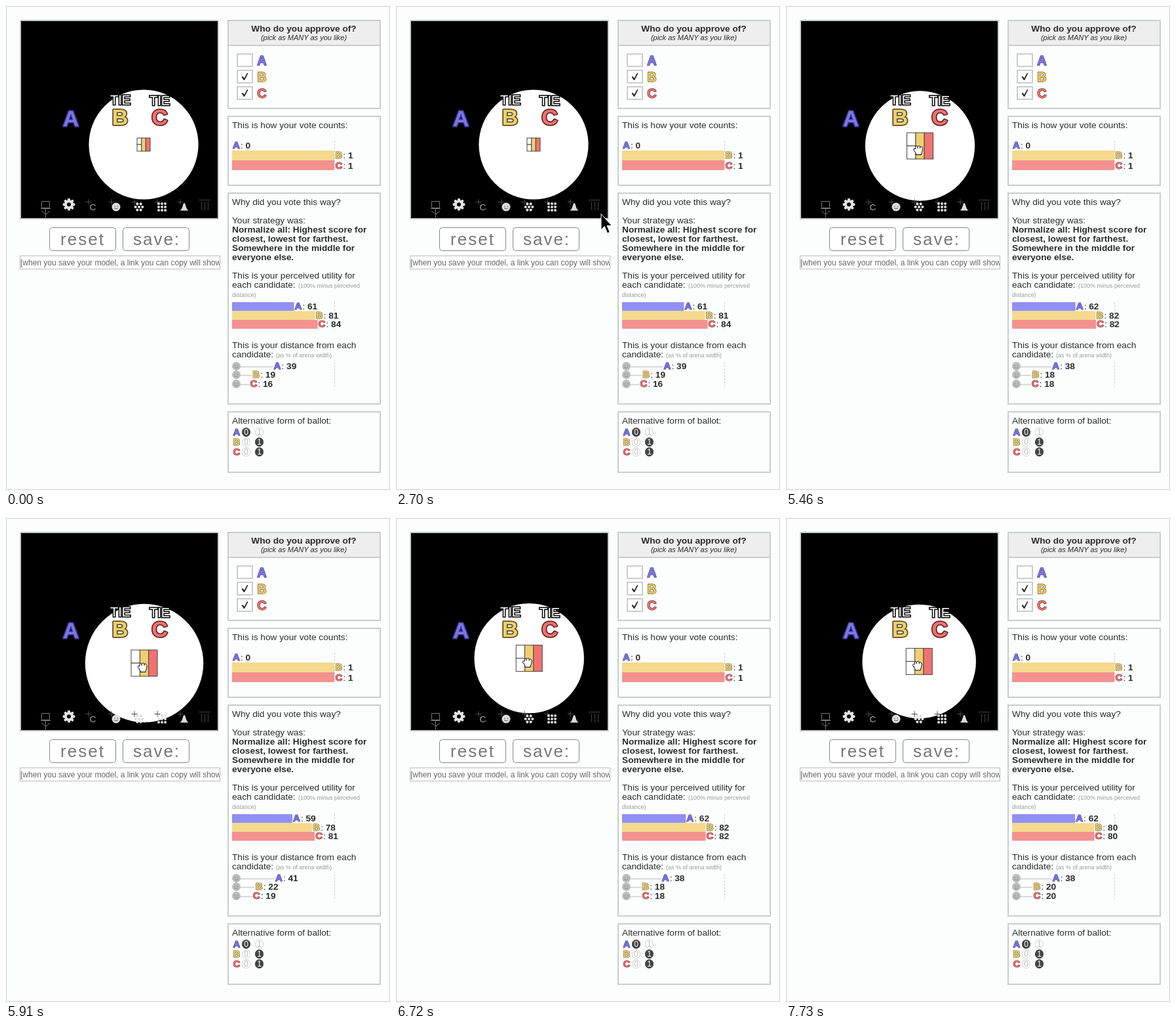
An HTML page that plays this animation: 586x737 px, repeating every 8 s.

```html
<!DOCTYPE html>
<html lang="en">
<head>
<meta charset="utf-8">
<title>Approval ballot</title>
<style>
  html, body { margin: 0; width: 100%; height: 100%; overflow: hidden; background: #fcfefe; }
  svg { display: block; width: 586px; height: 737px; }
  text { font: 13.7px "Liberation Sans", Arial, sans-serif; fill: #2b2b2b; white-space: pre; }
  .bold { font-weight: bold; }
  .mid { text-anchor: middle; }
  .note { font-size: 9px; fill: #999; }
  .box { fill: none; stroke: #ccc; stroke-width: 2; }
  .btn { fill: #fff; stroke: #888; }
  .btnText { font-size: 26px; letter-spacing: 2px; fill: #777; }
  .name { font-weight: bold; paint-order: stroke; stroke-linejoin: round; }
  .A { fill: #7d77ea; stroke: #35317f; }
  .B { fill: #efcf6f; stroke: #5d4d1c; }
  .C { fill: #f07272; stroke: #6b2626; }
  .big { font-size: 34px; stroke-width: 3.5; text-anchor: middle; }
  .row { font-size: 20px; stroke-width: 1.3; text-anchor: middle; }
  .small { font-size: 15px; stroke-width: 1.1; }
  .barA { fill: #9090f4; }
  .barB { fill: #f4d98e; }
  .barC { fill: #f49290; }
  .tie { font-size: 20px; fill: #fff; stroke: #000; stroke-width: 3; paint-order: stroke; text-anchor: middle; }
  .dash { stroke: #ccc; stroke-dasharray: 3 2; }
  .pill { font-size: 12px; text-anchor: middle; }
  .plus { stroke: #4c4c4c; }
  .cursor { stroke-linejoin: round; stroke-linecap: round; }
</style>
</head>
<body>
<svg id="stage" viewBox="0 0 586 737"></svg>
<script>
const NAMES = ['A', 'B', 'C'];
const SPOTS = { A: [99, 170], B: [174, 167.6], C: [233.5, 168.2] };
const LEFT = 345, FULL = 156, ARENA = 300, LOOP = 8000;
const UTIL_Y = [451, 464.5, 478], DIST_Y = [549, 562, 576];

// time, x, y of the pointer on its way to the voter
const APPROACH = [
  [1460, 111, 717], [1580, 145, 705], [1720, 175, 672], [1860, 205, 640],
  [2000, 250, 605], [2150, 295, 560], [2290, 322, 500], [2430, 338, 413],
  [2550, 334, 362], [2700, 313, 317], [2850, 286, 283], [3000, 257, 252],
  [3150, 232, 230], [3300, 207, 210], [3450, 206, 217]
];
const HOVER = 3300, GRAB = 4450;
// time, x, y of the voter while it is dragged around
const DRAG = [
  [0, 210, 211], [5310, 207, 211], [5460, 204.5, 213], [5610, 204, 217],
  [5760, 206.5, 220], [5910, 211, 221], [6030, 216, 220], [6180, 220, 216],
  [6330, 221, 212], [6450, 218.5, 208.5], [6590, 209, 208], [6720, 203.2, 213.6],
  [6850, 203.5, 219.5], [6990, 213, 220], [7130, 220, 215], [7280, 217, 209],
  [7420, 208, 210], [7560, 203.5, 213], [7730, 203.2, 218.4]
];

const stage = document.getElementById('stage');
const text = (x, y, s, cls = '') => `<text x="${x}" y="${y}" class="${cls}">${s}</text>`;
const rect = (x, y, w, h, attrs) => `<rect x="${x}" y="${y}" width="${w}" height="${h}" ${attrs}/>`;
const panel = (y, h) => rect(339, y + 1, 232, h - 2, 'class="box"');
const dash = (y1, y2) => `<path d="M501.5 ${y1}V${y2}" class="dash"/>`;
const dot = (x, y, r, fill) => `<circle cx="${x}" cy="${y}" r="${r}" fill="${fill}"/>`;
const face = (x, y, fill, ink) => dot(x, y, 6.5, fill) + dot(x - 2.2, y - 1, .8, ink) + dot(x + 2.2, y - 1, .8, ink) +
  `<path d="M${x - 3} ${y + 1.5}q3 3 6 0" fill="none" stroke="${ink}"/>`;
const label = (n, x, y, value, id = '') =>
  `<g id="${id}" transform="translate(${x} ${y})">` + text(0, 0, n, `name small ${n}`) +
  text(12, 0, ':') + text(19.5, 0, value, 'bold') + '</g>';
const pill = (x, y, s, on) =>
  rect(x - 6, y - 6.5, 12, 13, `rx="6" fill="${on ? '#444' : '#fff'}" stroke="${on ? '#444' : '#ccc'}"`) +
  `<text x="${x}" y="${y + 4.3}" class="pill" style="fill:${on ? '#fff' : '#bbb'}">${s}</text>`;

function toolbar() {
  let s = `<g fill="none" stroke="#777"><path d="M54.5 297.5h12v10h-12zM53 308.5h15M60.5 308v14M54 312l6.5 5.5 6.5-5.5"/></g>`;
  s += '<g fill="#e4e4e4">';
  for (let a = 0; a < 360; a += 45) s += rect(94, 293, 4, 5, `rx="1" transform="rotate(${a} 96 302.3)"`);
  s += '</g><circle cx="96" cy="302.3" r="5" fill="none" stroke="#e4e4e4" stroke-width="4"/>';
  for (let x = 126; x <= 266; x += 35) s += `<path d="M${x - 4.5} 298.5h9M${x} 294v9" class="plus"/>`;
  s += `<text x="132.5" y="311" class="mid" style="fill:#aaa">C</text>` + face(168, 306, '#ddd', '#555');
  s += dot(203, 306, 2.1, '#ddd');
  for (let i = 0; i < 6; i++) {
    const a = i * Math.PI / 3;
    s += dot(203 + 5.3 * Math.cos(a), 306 + 5.3 * Math.sin(a), 2.1, '#ddd');
  }
  for (let i = 0; i < 9; i++) s += dot(233 + i % 3 * 5, 301 + Math.floor(i / 3) * 5, 2, '#ddd');
  s += '<path d="M265 311.5C270 310 269.500 300 272 300S274 310 279 311.500Z" fill="#ddd"/>';
  return s + '<path d="M294 295.500h18M298.500 298v13M303.500 298v13M308.500 298v13" stroke="#444"/>';
}

function arena() {
  let s = rect(22, 22, 302, 302, 'fill="#000" stroke="#ccc" stroke-width="2"') +
    '<circle id="reach" fill="#fff"/>' + toolbar();
  s += '<g id="voter" stroke="#444">' + rect(-10, -10, 6.7, 10, 'fill="#fff"') + rect(-10, 0, 6.7, 10, 'fill="#fff"') +
    rect(-3.3, -10, 6.6, 20, 'fill="#efcf6f"') + rect(3.3, -10, 6.7, 20, 'fill="#f07272"') + '</g>';
  s += text(99, 183, 'A', 'name big A') + text(174, 180.5, 'B', 'name big B') + text(234.5, 181, 'C', 'name big C');
  return s + text(174.5, 150, 'TIE', 'tie') + text(234.5, 151, 'TIE', 'tie');
}

function controls() {
  return rect(66.5, 337.5, 101, 35, 'rx="4" class="btn"') + text(117, 364, 'reset', 'btnText mid') +
    rect(178.5, 337.5, 101, 35, 'rx="4" class="btn"') + text(230, 364, 'save:', 'btnText mid') +
    rect(21.5, 380.5, 305, 20, 'fill="#fff" stroke="#bbb"') +
    '<clipPath id="field">' + rect(22, 381, 304, 19, '') + '</clipPath><g clip-path="url(#field)">' +
    '<text x="22" y="395" style="font-size:12px;fill:#666">[when you save your model, a link you can copy will show</text></g>';
}

function ballot() {
  let s = rect(340, 23, 230, 36, 'fill="#eee"') + panel(21, 136) + '<path d="M340 60h230" class="box"/>' +
    text(454.5, 39, 'Who do you approve of?', 'bold mid') +
    '<text x="454.5" y="52" class="mid" style="font-size:11px;font-style:italic">(pick as MANY as you like)</text>';
  NAMES.forEach((n, i) => {
    const y = 73 + 25 * i;
    s += rect(353, y, 23, 19, 'fill="#fff" stroke="#ccc" stroke-width="2"') + text(390.5, y + 17, n, `name row ${n}`);
    if (i) s += `<path d="M359.500 ${y + 10}l2-1 2 3 4.500-8 1.500.5-5.500 10.500h-1z" fill="#222"/>`;
  });
  return s;
}

function counts() {
  return panel(167, 107) + text(LEFT, 186, 'This is how your vote counts:') + dash(205, 250) +
    rect(LEFT, 220, FULL, 15, 'class="barB"') + rect(LEFT, 235, FULL, 15, 'class="barC"') +
    label('A', 346, 217, 0) + label('B', 502.5, 232, 1) + label('C', 502.5, 248, 1);
}

function reasons() {
  let s = panel(284, 323) + text(LEFT, 303, 'Why did you vote this way?') + text(LEFT, 331, 'Your strategy was:');
  ['Normalize all: Highest score for', 'closest, lowest for farthest.', 'Somewhere in the middle for', 'everyone else.']
    .forEach((line, i) => s += text(LEFT, 345 + 14 * i, line, 'bold'));
  s += text(LEFT, 415, 'This is your perceived utility for') + text(LEFT, 429, 'each candidate:') +
    text(446, 429, '(100% minus perceived', 'note') + text(LEFT, 443, 'distance)', 'note') +
    text(LEFT, 521, 'This is your distance from each') + text(LEFT, 535, 'candidate:') +
    text(412, 535, '(as % of arena width)', 'note') + dash(451, 492) + dash(542, 583);
  NAMES.forEach((n, i) => {
    s += rect(LEFT, UTIL_Y[i], 0, 13.5, `id="bar${n}" class="bar${n}"`) + label(n, 0, 0, '', 'util' + n) +
      `<path id="line${n}" stroke="#ccc" stroke-width="1.500"/>` + face(351.5, DIST_Y[i] - .5, '#bbb', '#888') +
      label(n, 0, 0, '', 'dist' + n);
  });
  return s;
}

function altBallot() {
  let s = panel(617, 94) + text(LEFT, 636, 'Alternative form of ballot:');
  NAMES.forEach((n, i) => {
    const y = 649 + 15 * i;
    s += text(346.5, y + 5, n, `name small ${n}`) + pill(366.5, y, 0, !i) + pill(386.5, y, 1, i > 0);
  });
  return s;
}

const CURSORS = `
  <path id="arrow" class="cursor" d="M0 0V23.500L5.300 18.500 9.500 29 13.300 27.400 9 17.500H16Z" fill="#000" stroke="#fff"/>
  <path id="open" class="cursor" d="M-5 3C-9-1-8-3-5-1L-6-5C-6-8-3-8-3-5L-2-8C-1-9 1-9 1-7 3-9 4-8 4-6 6-7 7-6 7-4 7 2 5 4 5 8H-3ZM-3-5v4M1-7v6M4-6v5" fill="#fff" stroke="#000"/>
  <path id="fist" class="cursor" d="M-5 2C-8-1-7-3-4-2V-4C-4-7-1-7-1-5 0-7 3-7 3-5 5-6 7-5 7-2 7 2 5 4 5 7H-3C-3 5-4 4-5 2ZM-1-5v2M3-5v2" fill="#fff" stroke="#000"/>`;

stage.innerHTML = rect(.5, .5, 585, 736, 'fill="none" stroke="#ccc"') + arena() + controls() +
  ballot() + counts() + reasons() + altBallot() + CURSORS;

const el = id => document.getElementById(id);
const set = (id, attrs) => { for (const k in attrs) el(id).setAttribute(k, attrs[k]); };
const at = (list, t) => list.filter(p => p[0] <= t).pop();

function setLabel(id, x, y, value) {
  set(id, { transform: `translate(${x} ${y})` });
  el(id).lastChild.textContent = value;
}

function setCursor(t, vx, vy) {
  const kind = t < APPROACH[0][0] ? '' : t < HOVER ? 'arrow' : t < GRAB ? 'open' : 'fist';
  const [x, y] = t < GRAB ? (at(APPROACH, t) || [0, 0, 0]).slice(1) : [vx - 3, vy + 6.5];
  for (const id of ['arrow', 'open', 'fist'])
    set(id, { transform: `translate(${x} ${y})`, visibility: id === kind ? 'visible' : 'hidden' });
}

function render(t) {
  const [, x, y] = at(DRAG, t);
  const dists = NAMES.map(n => Math.hypot(x - SPOTS[n][0], y - SPOTS[n][1]));
  // approval reaches halfway between the closest and the farthest candidate
  set('reach', { cx: x, cy: y, r: (Math.min(...dists) + Math.max(...dists)) / 2 });
  const scale = t < GRAB ? 1 : 2;
  set('voter', { transform: `translate(${x} ${y}) scale(${scale})`, 'stroke-width': 1 / scale });
  NAMES.forEach((n, i) => {
    const share = dists[i] / ARENA;
    const utilWidth = (1 - share) * FULL, distX = LEFT + share * FULL + 2;
    set('bar' + n, { width: utilWidth });
    setLabel('util' + n, LEFT + utilWidth + 1, UTIL_Y[i] + 11, Math.round(100 - share * 100));
    set('line' + n, { d: `M351 ${DIST_Y[i] + .5}H${distX - 1}` });
    setLabel('dist' + n, distX, DIST_Y[i] + 4, Math.round(share * 100));
  });
  setCursor(t, x, y);
}

function tick() {
  render(performance.now() % LOOP);
  requestAnimationFrame(tick);
}
tick();
</script>
</body>
</html>
```
